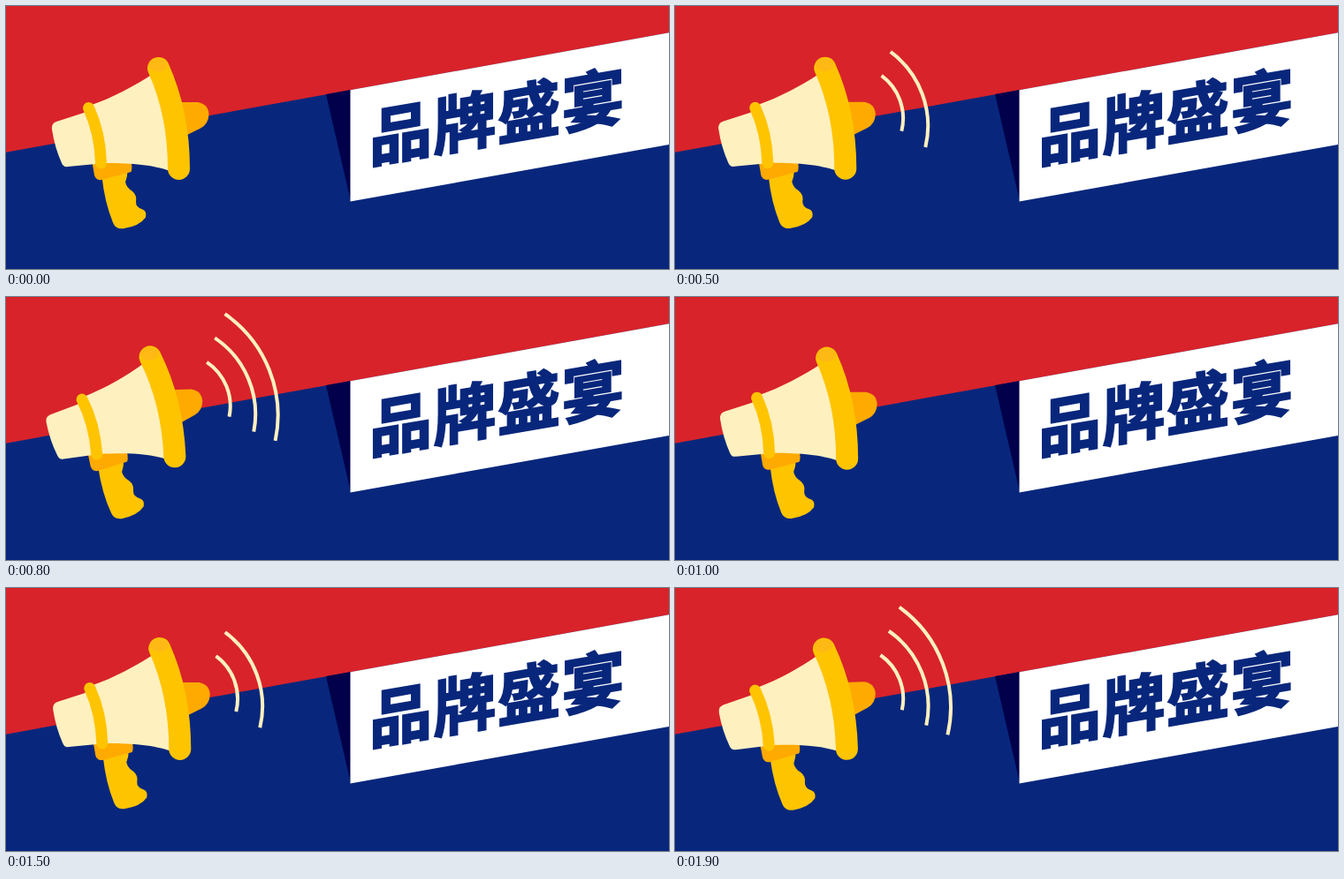
Write an HTML page that moves like this. It is 750 by 298 pixels and loops after 2000 ms.

```html
<!DOCTYPE html>
<html lang="zh-CN">
<head>
<meta charset="utf-8">
<title>品牌盛宴</title>
<style>
  html, body { margin: 0; width: 100%; height: 100%; overflow: hidden; background: #08277c; }
  svg { display: block; width: 100%; height: 100%; }
  text {
    font: 700 71px "Noto Sans CJK SC", "Noto Sans CJK", sans-serif;
    letter-spacing: 1.5px;
    fill: #08277c; stroke: #08277c; stroke-width: 2;
  }
  .yellow { fill: #ffc400; }
  .orange { fill: #ffaa00; }
  .cream { fill: #fff0bf; }
  .line { fill: none; stroke: #ffc400; stroke-linecap: round; }
  .wave { fill: none; stroke: #fff0bf; stroke-width: 4; }
</style>
</head>
<body>
<svg viewBox="0 0 750 298">
  <rect width="750" height="298" fill="#08277c"/>
  <path d="M0 0H750V30.200L0 165.700Z" fill="#d8232a"/>
  <path d="M362 100L390 95V221Z" fill="#02004b"/>
  <path d="M389.500 95.300L750 30.200V157L389.500 221.500Z" fill="#fff"/>
  <text transform="matrix(1 -.172 0 1 411 176.800)">品牌盛宴</text>

  <g id="horn">
    <path class="orange" d="M194 109H217Q229 111 229.500 123Q229 134 220 138.500L203 147Z"/>
    <path class="yellow" d="M108.500 193.500L137.500 187Q137.500 193 135 199.500Q136.500 206 142.500 209.500Q148.500 214.500 147 221.500Q146.500 228 154.500 230.500Q159.500 232.500 158 239.500Q151 249.500 132.500 252.300Q124 253 121 245.500Q111.500 222 108.500 193.500Z"/>
    <path class="orange" d="M97 174H141Q143.500 183 141.500 188L108 197Q102 198 100 192Z"/>
    <path class="cream" d="M57 131L88 121L97 112C120 104 145 91 166 77Q196 122 186 187C165 180 145 178 112 178L70 182Q65 183 63 178Q55 160 52 140Q51 133 57 131Z"/>
    <path class="line" stroke-width="25" d="M172.500 70.500Q195.500 122 195.500 184.500"/>
    <ellipse cx="172" cy="67" rx="10.500" ry="7.500" fill="#ffb914"/>
    <path class="line" stroke-width="13" d="M93.500 115.500Q106.500 144 107.500 178"/>
    <path class="wave" d="M236.300 79.200A60 60 0 0 1 259 142"/>
    <path class="wave" d="M246.500 52.200A104 104 0 0 1 286 160.200"/>
    <path class="wave" d="M259 25.500A140 140 0 0 1 309.900 171.500"/>
  </g>
</svg>
<script>
  const LOOP = 2000, STEP = 100, SWING = 1000;
  const drift = [[0, 0], [-3.2, -0.3], [1.5, -2.4], [0, 0]];
  const horn = document.getElementById('horn');
  const waves = horn.querySelectorAll('.wave');
  const ease = u => u * u * (3 - 2 * u);

  function driftAt(t) {
    const pos = t / LOOP * 3;
    const i = Math.floor(pos);
    const u = ease(pos - i);
    return drift[i].map((from, axis) => from + (drift[i + 1][axis] - from) * u);
  }

  function draw(now) {
    const t = Math.floor(now % LOOP / STEP) * STEP;
    const [x, y] = driftAt(t);
    const angle = 2.55 * Math.sin(2 * Math.PI * t / SWING);
    horn.setAttribute('transform', `translate(${x} ${y}) rotate(${angle} 118 228)`);

    // One more wave every three steps, after one silent step.
    const count = Math.ceil(t % SWING / (3 * STEP));
    waves.forEach((wave, i) => wave.setAttribute('visibility', i < count ? 'visible' : 'hidden'));
  }

  const start = performance.now();
  function tick() {
    draw(performance.now() - start);
    requestAnimationFrame(tick);
  }
  tick();
</script>
</body>
</html>
```
